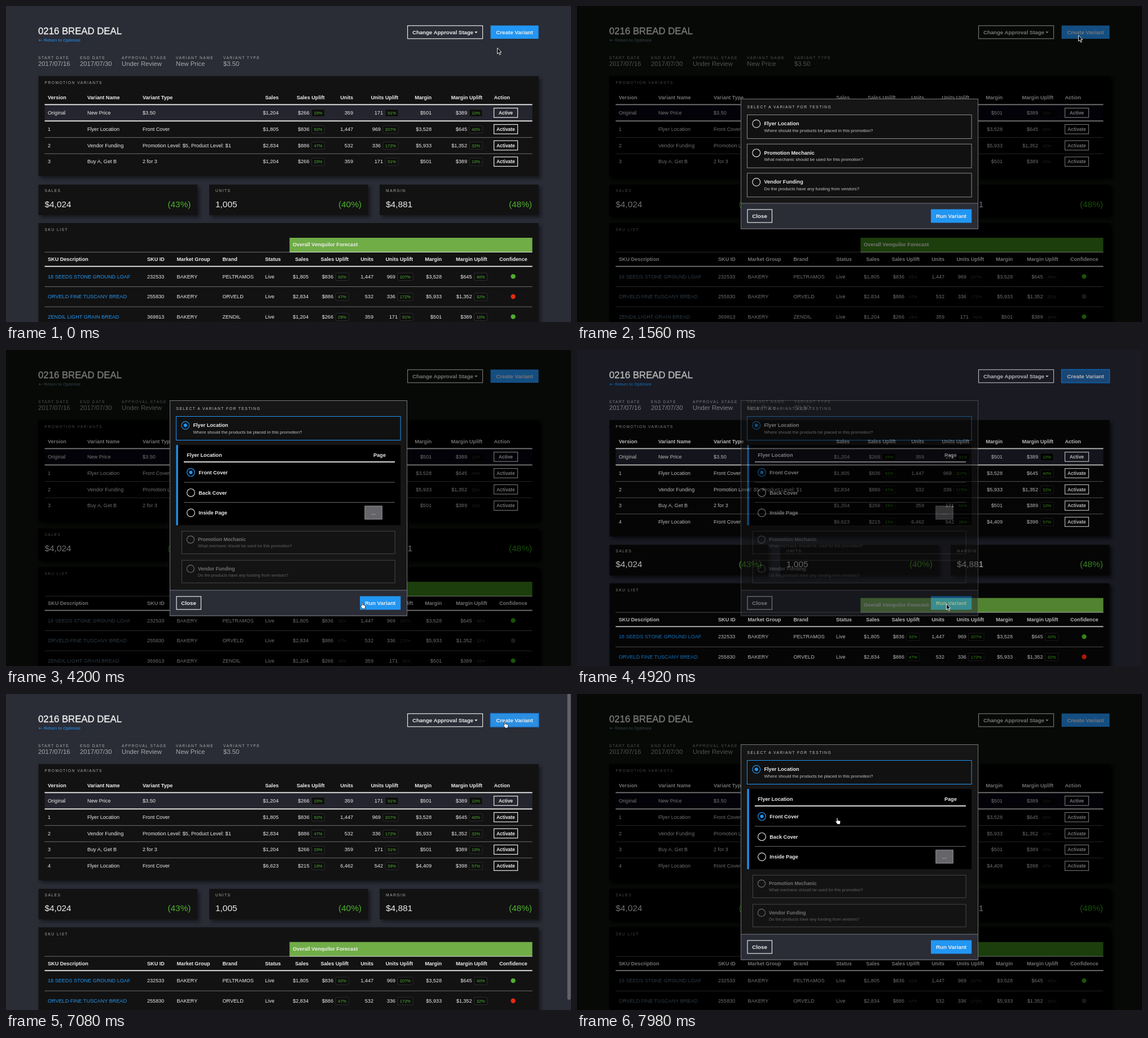
These frames come from a looping animation (1001x559 px, 8 s). An HTML page:

```html
<!DOCTYPE html>
<html lang="en">
<head>
<meta charset="utf-8">
<title>Promotion variants</title>
<style>
html, body { margin: 0; width: 100%; height: 100%; overflow: hidden; background: #2a2c36; }
svg { position: absolute; left: 0; top: 0; width: 1001px; height: 559px; }
text { font: 9.1px "Liberation Sans", Arial, sans-serif; fill: #ececec; white-space: pre; }
.b { font-weight: bold; }
.e { text-anchor: end; }
.m { text-anchor: middle; }
.label { font-size: 6.7px; letter-spacing: 1.47px; fill: #a9a9ab; }
.title { font-size: 16.75px; stroke: #ececec; stroke-width: .4; }
.meta { font-size: 11.3px; fill: #a9a9ae; }
.link { fill: #2196f3; }
.small { font-size: 7.8px; }
.btn { font-size: 9.75px; }
.act { font-size: 8.45px; }
.big { font-size: 15.4px; }
.badge { font-size: 7.5px; }
.green { fill: #4fb32f; }
.sub { font-size: 7.8px; fill: #c4c4c4; }
.back { fill: #2a2c36; }
.bar { fill: #70ad47; }
.good { fill: #4fae2e; }
.bad { fill: #e32b12; }
.arrow { fill: none; stroke: #2196f3; stroke-width: .8; }
.panel { fill: #121212; filter: drop-shadow(4px 4px 3px #0007); }
.box { fill: none; stroke: #e8e8e8; stroke-width: 1.2; }
.opt { fill: #111; stroke: #8c8c8c; }
.opt.hover { stroke: #fff; }
.opt.picked { stroke: #2196f3; }
.radio circle { fill: none; stroke: #dcdcdc; stroke-width: 1.2; }
.radio .dot { display: none; }
.radio.on circle { stroke: #2196f3; }
.radio.on .dot { display: block; fill: #2196f3; stroke: none; }
#create { fill: #2196f3; }
#create.hover { fill: #2b8fe2; }
#create.focus { fill: #2a629c; stroke: #1f80d8; stroke-width: 1.6; }
#create.hover.focus { fill: #2b8fe2; }
/* muted colours behind the dialog */
.dim .back { fill: #2d302b; }
.dim .bar { fill: #518c35; }
.dim .link { fill: #7a93a4; }
.dim .arrow { stroke: #7a93a4; }
.dim .badge { fill: #68706a; }
.dim .bad { fill: #514e48; }
.dim #create { fill: #43a7ff; }
</style>
</head>
<body>
<svg id="page" viewBox="0 0 1001 559"></svg>
<svg id="top" viewBox="0 0 1001 559"></svg>
<script>
const LOOP = 8000, ROW = 28.7, GROW = 151;
const $ = id => document.getElementById(id);

const text = (x, y, s, cls = '') => `<text x="${x}" y="${y}" class="${cls}">${s}</text>`;
const rect = (x, y, w, h, attr = '') => `<rect x="${x}" y="${y}" width="${w}" height="${h}" ${attr}/>`;
const rule = (x1, x2, y, strong) =>
  rect(x1, y - (strong ? .9 : .5), x2 - x1, strong ? 1.8 : 1, `fill="${strong ? '#f0f0f0' : '#6c6c6c'}"`);
const panel = (x, y, w, h) => rect(x, y, w, h, 'class="panel"');
const radio = (x, y, id) =>
  `<g class="radio" id="${id}"><circle cx="${x}" cy="${y}" r="6.9"/><circle class="dot" cx="${x}" cy="${y}" r="3"/></g>`;

// sales, uplift, units, uplift, margin, uplift
const figures = {
  a: ['$1,204', '$266 29%', '359', '171 91%', '$501', '$389 10%'],
  b: ['$1,805', '$836 92%', '1,447', '969 207%', '$3,528', '$645 40%'],
  c: ['$2,834', '$886 47%', '532', '336 172%', '$5,933', '$1,352 32%'],
  d: ['$6,623', '$215 19%', '6,462', '542 39%', '$4,409', '$398 57%']
};
const heads = ['Sales', 'Sales Uplift', 'Units', 'Units Uplift', 'Margin', 'Margin Uplift'];
const promoCols = [483, 564.5, 615, 695, 754, 844];
const skuCols = [536, 607, 651, 721, 772, 852.5];

const headRow = (cols, y) => heads.map((h, i) => text(cols[i], y, h, 'b e')).join('');

function metrics(cols, y, key) {
  return figures[key].map((v, i) => {
    const [num, pct] = v.split(' '), right = cols[i];
    if (!pct) return text(right, y, num, 'e');
    const w = ((pct.length - 1) * .556 + .889) * 7.5 + 8;
    return text(right - w - 4, y, num, 'e') +
      rect(right - w, y - 9.3, w, 13, 'rx="1.5" fill="#0e0e0e" stroke="#2d2d2d"') +
      text(right - w / 2, y - .1, pct, 'badge green m');
  }).join('');
}

function promoRow(i, version, name, type, key) {
  const y = i ? 221 + ROW * (i - 1) : 192;
  return text(74, y, version) + text(144, y, name) + text(242, y, type) +
    metrics(promoCols, y, key) +
    rect(864.5, y - 11.4, 42, 16.6, 'class="box"') +
    text(885.4, y - .2, i ? 'Activate' : 'Active', 'act b m');
}

function skuRow(i, name, id, brand, key, mark) {
  const y = 481.7 + 35.6 * i;
  return text(74, y, name, 'link') + text(250, y, id) + text(302.5, y, 'BAKERY') +
    text(383.5, y, brand) + text(459, y, 'Live') + metrics(skuCols, y, key) +
    `<circle cx="898.5" cy="${y - 3.3}" r="4.2" class="${mark}"/>` +
    rule(68.5, 932.5, y + 14.8);
}

const stat = (x, name, value, pct) => panel(x, 316, 281.5, 54) + text(x + 11, 329.4, name, 'label') +
  text(x + 11, 355.8, value, 'big') + text(x + 270, 355.8, pct, 'big green e');

const meta = [[57, 'START DATE', '2017/07/16'], [131, 'END DATE', '2017/07/30'],
  [205, 'APPROVAL STAGE', 'Under Review'], [301, 'VARIANT NAME', 'New Price'], [385, 'VARIANT TYPE', '$3.50']];

$('page').innerHTML = rect(0, 0, 1001, 559, 'class="back"') +
  text(57, 49.8, '0216 BREAD DEAL', 'title') +
  '<path class="arrow" d="M64 60.6h-6m2-1.8l-2 1.8 2 1.8"/>' +
  text(67, 63.2, 'Return to Optimize', 'small link') +
  rect(711.5, 34.8, 133, 23, 'class="box"') +
  text(720, 49.6, 'Change Approval Stage', 'b" style="font-size:9.6px') +
  '<path d="M830 45.3h5.6l-2.8 3z" fill="#eee"/>' +
  rect(858.5, 34.5, 85, 23.5, 'id="create"') + text(901, 49.7, 'Create Variant', 'btn b m') +
  meta.map(([x, k, v]) => text(x, 94.4, k, 'label') + text(x, 106, v, 'meta')).join('') +
  `<rect id="promo" class="panel" x="57.5" y="124" width="886" height="177"/>` +
  text(68.5, 137.9, 'PROMOTION VARIANTS', 'label') +
  text(74, 165.2, 'Version', 'b') + text(144, 165.2, 'Variant Name', 'b') +
  text(242, 165.2, 'Variant Type', 'b') + headRow(promoCols, 165.2) + text(864.5, 165.2, 'Action', 'b') +
  rect(68.5, 175, 864, 28, 'fill="#24252e"') + rule(68.5, 932.5, 174.4, 1) + rule(68.5, 932.5, 203.4, 1) +
  promoRow(0, 'Original', 'New Price', '$3.50', 'a') +
  promoRow(1, '1', 'Flyer Location', 'Front Cover', 'b') + rule(68.5, 932.5, 232.6) +
  promoRow(2, '2', 'Vendor Funding', 'Promotion Level: $5, Product Level: $1', 'c') + rule(68.5, 932.5, 261.3) +
  promoRow(3, '3', 'Buy A, Get B', '2 for 3', 'a') +
  `<g id="added">${rule(68.5, 932.5, 290)}${promoRow(4, '4', 'Flyer Location', 'Front Cover', 'd')}</g>` +
  '<g id="lower">' +
  stat(57.5, 'SALES', '$4,024', '(43%)') + stat(360, 'UNITS', '1,005', '(40%)') + stat(662, 'MARGIN', '$4,881', '(48%)') +
  panel(57.5, 384, 886, 220) + text(68.5, 398, 'SKU LIST', 'label') +
  rect(502.3, 410, 430.2, 25.2, 'class="bar"') + text(508, 425.3, 'Overall Venquilor Forecast', 'b') +
  rule(68.5, 502.3, 435.4) + rect(502.3, 434.9, 430.2, 1, 'fill="#e8e8e8"') +
  [[74, 'SKU Description'], [250, 'SKU ID'], [302.5, 'Market Group'], [383.5, 'Brand'], [459, 'Status'], [874, 'Confidence']]
    .map(([x, s]) => text(x, 451.4, s, 'b')).join('') +
  headRow(skuCols, 451.4) + rule(68.5, 932.5, 460.6, 1) +
  skuRow(0, '18 SEEDS STONE GROUND LOAF', '232533', 'PELTRAMOS', 'b', 'good') +
  skuRow(1, 'ORVELD FINE TUSCANY BREAD', '255830', 'ORVELD', 'c', 'bad') +
  skuRow(2, 'ZENDIL LIGHT GRAIN BREAD', '369813', 'ZENDIL', 'a', 'good') +
  '</g>' + rect(994.5, -4, 6, 545, 'id="scroll" rx="3" fill="#626369"');

const option = (y, id, name, hint) => `<g id="${id}">` +
  rect(301.5, y, 397.5, 42, 'class="opt"') + radio(317.8, y + 15.7, id + 'Radio') +
  text(331.5, y + 18.5, name, 'b') + text(331.5, y + 30.2, hint, 'sub') + '</g>';

const place = (y, id, name) => radio(327.5, y, id) + text(341.3, y + 3.2, name, 'b');

$('top').innerHTML = '<g id="modal">' +
  '<rect id="frame" x="290.5" y=".5" width="420" fill="#161616" stroke="#74767c"/>' +
  text(301.5, 16.9, 'SELECT A VARIANT FOR TESTING', 'label" style="fill:#c6c6c6') +
  option(28.5, 'flyer', 'Flyer Location', 'Where should the products be placed in this promotion?') +
  '<g id="details">' + rect(302, 79, 397, 142, 'fill="#000"') + rect(301.5, 79, 3.2, 142, 'fill="#2196f3"') +
  text(320.3, 100, 'Flyer Location', 'b') + text(651, 100, 'Page', 'b') + rule(315, 689, 109, 1) +
  place(127.6, 'front', 'Front Cover') + rule(315, 689, 145) +
  place(163.4, 'back', 'Back Cover') + rule(315, 689, 180.6) +
  place(199, 'inside', 'Inside Page') +
  rect(635.8, 187, 30.4, 23.3, 'fill="#66666a" stroke="#96969a"') + text(651, 202, '...', 'm') + '</g>' +
  option(80.2, 'mechanic', 'Promotion Mechanic', 'What mechanic should be used for this promotion?') +
  option(131.8, 'vendor', 'Vendor Funding', 'Do the products have any funding from vendors?') +
  '<g id="footer">' + rect(290.5, 0, 420, 45, 'fill="#2a2c36" stroke="#74767c"') +
  rect(302, 11, 43.5, 23, 'class="box"') + text(323.6, 26, 'Close', 'btn b m') +
  rect(627, 10.5, 72.2, 24, 'fill="#2196f3"') + text(663, 26, 'Run Variant', 'btn b m') + '</g></g>' +
  '<g id="cursor"><path id="arrow" d="M0 0v10.6l2.4-2.2 1.7 4 1.7-.7-1.7-3.9h3.2z" fill="#000" stroke="#fff" stroke-width=".9"/>' +
  '<path id="hand" d="M1 1.2c0-1.4 1.9-1.4 1.9 0v3.3l3.6.8c1 .2 1.4.8 1.3 1.7l-.6 3c-.1.6-.3.9-.3 1.5h-4.6c-.3-.8-1-1.6-1.7-2.5L-.9 7c-.5-.9.5-1.5 1.2-.9l.7.6z" fill="#fff" stroke="#000" stroke-width=".7"/></g>';

const ramp = (t, start, length) => Math.min(1, Math.max(0, (t - start) / length));
const smooth = p => p * p * (3 - 2 * p);
const within = (t, a, b) => t >= a && t < b;
const show = (id, on) => $(id).style.display = on ? '' : 'none';
const shift = (id, y) => $(id).setAttribute('transform', `translate(0 ${y})`);

// time, x, y
const path = [[0, 870.5, 74], [60, 870.5, 74], [480, 888.5, 51.8], [1620, 888.5, 51.8], [2280, 348, 205],
  [3930, 348, 205], [4200, 629, 446.3], [4440, 654.5, 449], [5640, 654.5, 449], [6480, 882, 48.5],
  [7260, 882, 48.5], [7860, 459, 219], [LOOP, 459, 219]];

function pointer(t) {
  const i = path.findIndex(k => k[0] > t), a = path[i - 1], b = path[i];
  const p = smooth((t - a[0]) / (b[0] - a[0]));
  return [a[1] + (b[1] - a[1]) * p, a[2] + (b[2] - a[2]) * p];
}

function shrink(id, y, p, dy) {
  const s = 1 - .05 * p, cy = y + 21;
  $(id).setAttribute('transform', `translate(500.5 ${cy + dy}) scale(${s}) translate(-500.5 ${-cy})`);
  $(id).style.opacity = 1 - .58 * p;
}

function draw(t) {
  const dim = ramp(t, 1260, 240) - ramp(t, 4800, 240) + ramp(t, 7110, 180);
  $('page').style.filter = dim ? `brightness(${1 - .496 * dim}) contrast(${1 + .15 * dim})` : 'none';
  $('page').classList.toggle('dim', dim > .5);

  const added = t >= 4860;
  show('added', added);
  $('promo').setAttribute('height', added ? 177 + ROW : 177);
  shift('lower', added ? ROW : 0);
  show('scroll', within(t, 5880, 7140));
  $('create').classList.toggle('hover', within(t, 360, 1260) || within(t, 6420, 7110));
  $('create').classList.toggle('focus', within(t, 4860, 7110));

  const open = t >= 2560, dy = open ? GROW : 0, height = 230 + dy;
  const p = ramp(t, 2560, 320), q = smooth(p);
  show('modal', dim > 0);
  $('modal').style.opacity = dim;
  shift('modal', Math.round(279.2 - height / 2));
  $('frame').setAttribute('height', height - .5);
  shift('footer', height - 45);
  show('details', open);
  $('details').style.opacity = p;
  shift('details', -14 * (1 - p));
  shrink('mechanic', 80.2, q, open ? dy - .8 : 0);
  shrink('vendor', 131.8, q, open ? dy - .8 : 0);
  const border = $('flyer').firstChild.classList;
  border.toggle('hover', within(t, 2220, 2760));
  border.toggle('picked', t >= 2760);
  $('flyerRadio').classList.toggle('on', open);
  $('front').classList.toggle('on', t >= 2940);

  const [x, y] = pointer(t);
  $('cursor').setAttribute('transform', `translate(${x} ${y})`);
  const hand = within(t, 360, 1260) || within(t, 2180, 4800) || within(t, 6420, 7140) || t >= 7620;
  show('hand', hand);
  show('arrow', !hand);
}

const start = performance.now();
function tick() {
  draw((performance.now() - start) % LOOP);
  requestAnimationFrame(tick);
}
tick();
</script>
</body>
</html>
```
